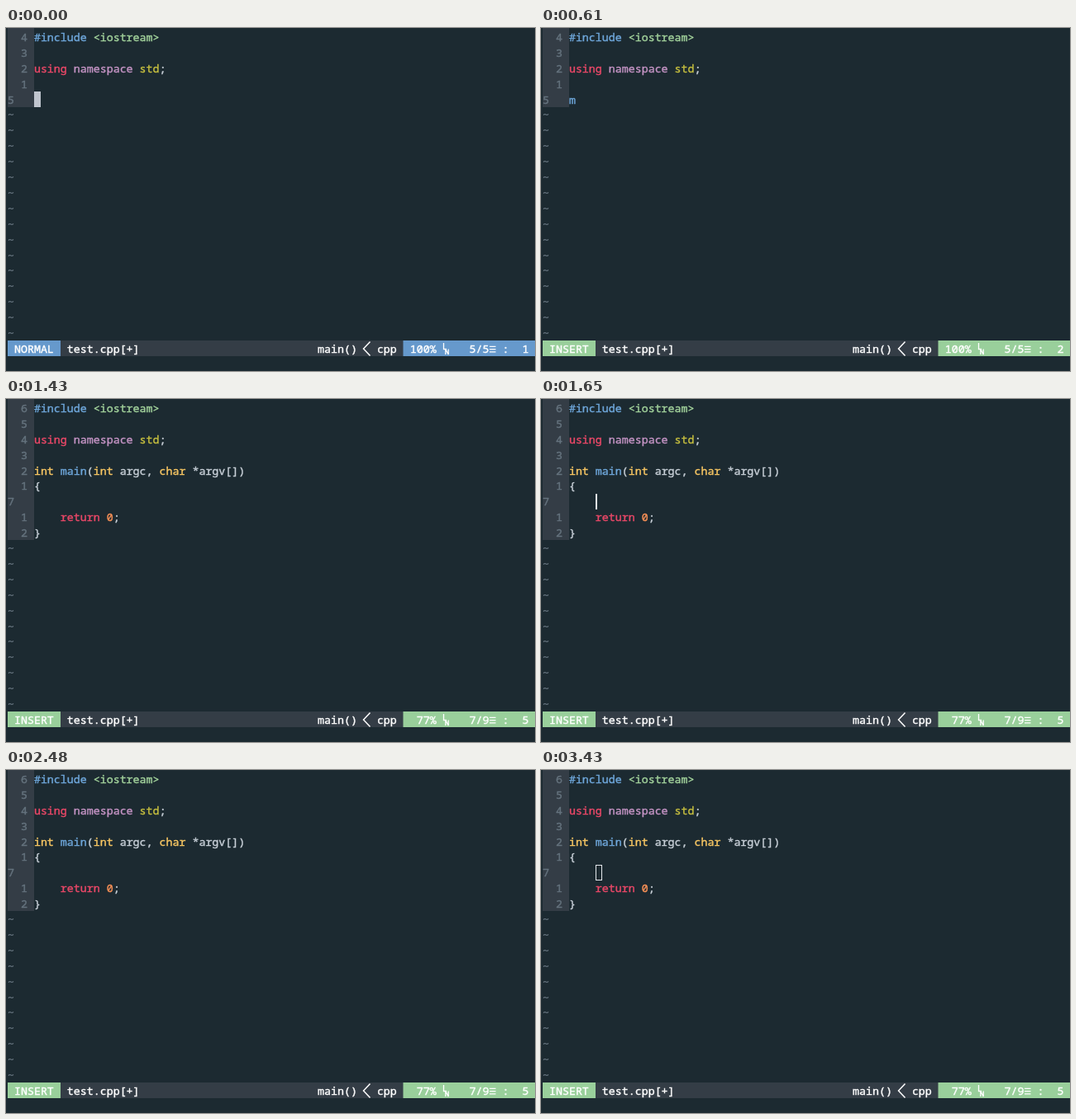
Animation, 640 px wide and 416 px high, one loop 3.47 s. Source, as an HTML page:

```html
<!DOCTYPE html>
<html>
<head>
<meta charset="utf-8">
<title>Editor session</title>
<style>
html, body { margin: 0; width: 100%; height: 100%; overflow: hidden; background: #1c2a31; }
svg { display: block; width: 640px; height: 416px; }
text { font: 500 13.3px "Noto Sans Mono", "DejaVu Sans Mono", monospace; white-space: pre; stroke-width: .4px; }
</style>
</head>
<body>
<svg id="stage" viewBox="0 0 640 416"></svg>
<script>
const LOOP = 3470, CELL = 7.98, ROW = 18.9, LEFT = 2, TOP = 1.3, GUTTER = 4;
const INSERT_AT = 440, TYPE_AT = 600, KEY_MS = 120, EXPAND_AT = 1330, BLUR_AT = 3390;
const BLINK_START = 620, BLINK = 500;
const C = {
  bg: '#1c2a31', bar: '#343d46', dim: '#65737e', text: '#c8d0d8', white: '#ffffff',
  red: '#ec4868', blue: '#6fa8dc', green: '#a3d39c', purple: '#c594c5',
  olive: '#c6bf3f', yellow: '#fac863', orange: '#f99157',
  normal: '#6699cc', insert: '#99cf9b', cursor: '#c0c5ce'
};
const HEAD = [
  [['#include ', 'blue'], ['<iostream>', 'green']],
  [],
  [['using ', 'red'], ['namespace ', 'purple'], ['std', 'olive'], [';', 'text']],
  []
];
const BODY = [
  [['int ', 'yellow'], ['main', 'blue'], ['(', 'text'], ['int ', 'yellow'], ['argc, ', 'text'],
    ['char ', 'yellow'], ['*argv[])', 'text']],
  [['{', 'text']],
  [],
  [['    ', 'text'], ['return ', 'red'], ['0', 'orange'], [';', 'text']],
  [['}', 'text']]
];
const stage = document.getElementById('stage');
const colX = c => LEFT + c * CELL;
const rowY = r => TOP + r * ROW;
const esc = s => s.replace(/&/g, '&amp;').replace(/</g, '&lt;');

function rect(x, y, w, h, fill) {
  return `<rect x="${x}" y="${y}" width="${w}" height="${h}" fill="${fill}"/>`;
}

function label(col, row, str, color) {
  return `<text x="${colX(col)}" y="${rowY(row) + 14.6}" fill="${C[color]}" stroke="${C[color]}">${esc(str)}</text>`;
}

function stroke(d, width) {
  return `<path d="${d}" fill="none" stroke="#fff" stroke-width="${width}"/>`;
}

function codeLine(parts, row) {
  let col = GUTTER;
  return parts.map(([str, color]) => {
    const out = label(col, row, str, color);
    col += str.length;
    return out;
  }).join('');
}

function lineNumber(row, current) {
  if (row === current) return label(0, row, String(row + 1), 'dim');
  return label(2, row, String(Math.abs(row - current)), 'dim');
}

function statusBar(s, total) {
  const y = Math.round(rowY(20)), h = 19, fill = s.insert ? C.insert : C.normal;
  const percent = Math.floor((s.row + 1) / total * 100) + '%';
  return rect(LEFT, y, 638, h, C.bar) + rect(LEFT, y, 64, h, fill) + rect(480.5, y, 159.5, h, fill) +
    label(1, 20, s.insert ? 'INSERT' : 'NORMAL', 'white') +
    label(9, 20, 'test.cpp[+]', 'white') +
    label(47, 20, 'main()', 'white') +
    label(56, 20, 'cpp', 'white') +
    label(61, 20, percent.padStart(4), 'white') +
    label(70, 20, `${s.row + 1}/${total}`, 'white') +
    label(75, 20, ':', 'white') +
    label(78, 20, String(s.col + 1), 'white') +
    stroke('M440.5 380.5L432.5 389L440.5 397.5', 1.5) +
    stroke('M529.5 382V389.5H533M531.8 396V389.5L535.2 396V389.5', 1.3) +
    stroke('M585 386.3H592.5M585 389.6H592.5M585 392.9H592.5', 1.3);
}

function cursor(s) {
  const x = Math.round(colX(GUTTER + s.col)), y = Math.round(rowY(s.row));
  if (s.blur) {
    return `<rect x="${x + .5}" y="${y + .5}" width="7" height="18" fill="none" stroke="#e4e8ec"/>`;
  }
  if (!s.shown) return '';
  return s.insert ? rect(x, y, 2, 19, '#e8ecef') : rect(x, y, 8, 19, C.cursor);
}

function stateAt(t) {
  const typed = Math.max(0, Math.min(4, Math.floor((t - TYPE_AT) / KEY_MS) + 1));
  const expanded = t >= EXPAND_AT;
  const phase = Math.floor((t - BLINK_START) / BLINK);
  return {
    insert: t >= INSERT_AT, typed, expanded,
    row: expanded ? 6 : 4, col: typed,
    shown: phase % 2 === 0,
    blur: t >= BLUR_AT
  };
}

function draw(s) {
  const tail = s.expanded ? BODY : [[['main'.slice(0, s.typed), 'blue']]];
  const lines = HEAD.concat(tail);
  let out = rect(0, 0, 640, 416, C.bg) + rect(LEFT, 0, 32, Math.round(rowY(lines.length)), C.bar);
  lines.forEach((parts, row) => {
    out += lineNumber(row, s.row) + codeLine(parts, row);
  });
  for (let row = lines.length; row < 20; row++) out += label(0, row, '~', 'dim');
  stage.innerHTML = out + statusBar(s, lines.length) + cursor(s);
}

let last = '';
function tick() {
  const s = stateAt(performance.now() % LOOP), key = JSON.stringify(s);
  if (key !== last) {
    draw(s);
    last = key;
  }
  requestAnimationFrame(tick);
}
tick();
</script>
</body>
</html>
```
